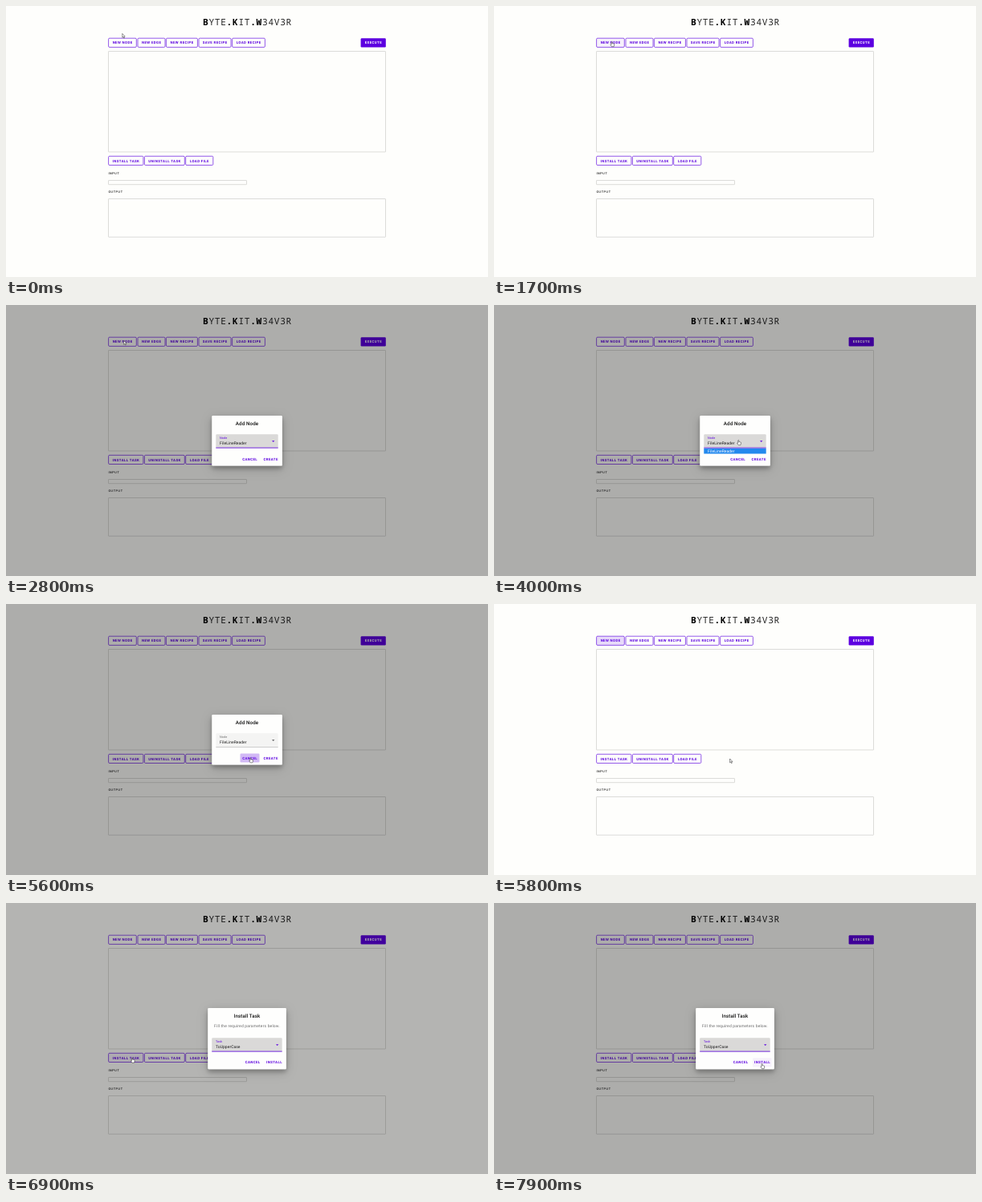
Write an HTML page that moves like this. It is 600 px wide and 338 px high and loops after 8 s.

```html
<!DOCTYPE html>
<html lang="en">
<head>
<meta charset="utf-8">
<title>Recipe editor</title>
<style>
  html, body { margin: 0; width: 100%; height: 100%; overflow: hidden; background: #fefefc; }
  svg { display: block; width: 100vw; height: 100vh; text-rendering: geometricPrecision; }
  text { font-family: Roboto, Arial, sans-serif; white-space: pre; }
  .btn { font-size: 4.375px; font-weight: 600; letter-spacing: .39px; text-anchor: middle; }
  .logo { font: 100 11.2px "Noto Sans Mono", "DejaVu Sans Mono", monospace; letter-spacing: .68px; fill: #222; }
  .logo tspan { font-weight: 900; fill: #000; }
  .over { font-size: 3.75px; font-weight: 500; letter-spacing: .62px; fill: #222; }
  .head { font-size: 6.25px; font-weight: 500; letter-spacing: .1px; text-anchor: middle; fill: #111; }
  .body { font-size: 5px; letter-spacing: .156px; text-anchor: middle; fill: #6b6b6b; }
  .value { font-size: 5px; letter-spacing: .047px; fill: #1c1c1c; }
</style>
</head>
<body>
<svg id="stage" viewBox="0 0 600 338" preserveAspectRatio="none">
  <defs>
    <filter id="shadow" x="-40%" y="-40%" width="180%" height="190%">
      <feDropShadow dx="0" dy="3.5" stdDeviation="2.4" flood-opacity=".22"/>
      <feDropShadow dx="0" dy="3" stdDeviation="6.5" flood-opacity=".2"/>
    </filter>
  </defs>
</svg>
<script>
const LOOP = 8000, STEP = 100;
const PURPLE = '#5c00e0';
const svg = document.getElementById('stage');

function add(parent, tag, attrs = {}, text) {
  const el = document.createElementNS('http://www.w3.org/2000/svg', tag);
  for (const key in attrs) el.setAttribute(key, attrs[key]);
  if (text) el.textContent = text;
  parent.append(el);
  return el;
}

const set = (el, key, value) => el.setAttribute(key, value);
const clamp = v => Math.max(0, Math.min(1, v));
const between = (t, a, b) => t >= a && t < b;

function rect(parent, x, y, x2, y2, attrs) {
  return add(parent, 'rect', { x, y, width: x2 - x, height: y2 - y, ...attrs });
}

function button(parent, label, x, x2, y, kind = 'outlined') {
  const y2 = y + 11.2, solid = kind === 'solid';
  const tint = rect(parent, x, y, x2, y2, { rx: 1.25, fill: PURPLE, 'fill-opacity': solid ? 1 : 0 });
  if (kind === 'outlined')
    rect(parent, x, y, x2, y2, { rx: 1.25, fill: 'none', stroke: PURPLE, 'stroke-width': .65 });
  add(parent, 'text', { class: 'btn', x: (x + x2) / 2 + .15, y: y + 7.2, fill: solid ? '#fff' : PURPLE }, label);
  return { tint, box: [x, y, x2, y2] };
}

// Page
rect(svg, 0, 0, 600, 338, { fill: '#fefefc' });
const logo = add(svg, 'text', { class: 'logo', x: 245, y: 24.2 });
[['B', 'YTE'], ['.K', 'IT'], ['.W', '34V3R']].forEach(([bold, thin]) => {
  add(logo, 'tspan', {}, bold);
  logo.append(thin);
});

const newNode = button(svg, 'NEW NODE', 127.6, 162.3, 40.2);
const pageButtons = [
  newNode,
  button(svg, 'NEW EDGE', 164, 198, 40.2),
  button(svg, 'NEW RECIPE', 199.4, 238.4, 40.2),
  button(svg, 'SAVE RECIPE', 240, 280, 40.2),
  button(svg, 'LOAD RECIPE', 281.6, 322.4, 40.2)
];
button(svg, 'EXECUTE', 441.6, 472.8, 40.2, 'solid');
const installTask = button(svg, 'INSTALL TASK', 127.6, 170.9, 187.3);
pageButtons.push(
  installTask,
  button(svg, 'UNINSTALL TASK', 172.4, 222.3, 187.3),
  button(svg, 'LOAD FILE', 223.7, 257.8, 187.3)
);

[[56.5, 472.5, 182], [217.5, 299.5, 222.7], [240.5, 472.5, 288.2]].forEach(([y, x2, y2]) =>
  rect(svg, 127.5, y, x2, y2, { fill: 'none', stroke: '#cdcdcb', 'stroke-width': .7, rx: .4 }));
add(svg, 'text', { class: 'over', x: 127.4, y: 209.7 }, 'INPUT');
add(svg, 'text', { class: 'over', x: 127.4, y: 233.2 }, 'OUTPUT');

// Dialogs
const scrim = rect(svg, 0, 0, 600, 338, { fill: '#000' });

function dialog(o) {
  const g = add(svg, 'g');
  const [x, y, x2, y2] = o.box;
  rect(g, x, y, x2, y2, { rx: 1.25, fill: '#fefefd', filter: 'url(#shadow)' });
  add(g, 'text', { class: 'head', x: 300, y: y + 12.2 }, o.title);
  if (o.note) add(g, 'text', { class: 'body', x: 300, y: y + 23.6 }, o.note);

  const sx = x + 5, sx2 = x2 - 5.2, sy = o.selectY, sy2 = sy + 17.2;
  const fill = add(g, 'path', {
    d: `M${sx} ${sy2}V${sy + 1.2}q0-1.2 1.2-1.2H${sx2 - 1.2}q1.2 0 1.2 1.2V${sy2}Z`
  });
  const line = rect(g, sx, sy2 - .5, sx2, sy2);
  const label = add(g, 'text', { class: 'value', x: sx + 4.8 }, o.label);
  add(g, 'text', { class: 'value', x: sx + 4.8, y: sy + 12.5 }, o.value);
  const arrow = add(g, 'path', { d: `M${sx2 - 7.7} ${sy + 7.9}h3.4l-1.7 1.8z` });
  const by = y2 - 14;
  return {
    ...o, g, fill, line, label, arrow, sx, sx2, sy, sy2,
    cancel: button(g, 'CANCEL', ...o.cancelX, by, 'text'),
    accept: button(g, o.action, ...o.acceptX, by, 'text')
  };
}

const addNode = dialog({
  box: [256.3, 137.9, 343.9, 200.4], title: 'Add Node', label: 'Node', value: 'FileLineReader',
  selectY: 161.3, action: 'CREATE', cancelX: [291.5, 315.5], acceptX: [317.5, 341.5],
  open: 2441, close: 5660, focus: [2600, 5500]
});
const install = dialog({
  box: [251.2, 131, 348.9, 207.2], title: 'Install Task', note: 'Fill the required parameters below.',
  label: 'Task', value: 'ToUpperCase',
  selectY: 168.3, action: 'INSTALL', cancelX: [295, 319], acceptX: [322.2, 345.6],
  open: 6763, close: LOOP, focus: [6900, LOOP]
});

const menu = add(addNode.g, 'g');
rect(menu, addNode.sx, 178.9, addNode.sx2, 185.5, { fill: '#2389ee' });
add(menu, 'text', { class: 'value', x: addNode.sx + 4.8, y: 183.8, style: 'fill:#fff' }, 'FileLineReader');

// Pointer
const pointer = add(svg, 'g', { stroke: '#222', 'stroke-width': .5, 'stroke-linejoin': 'round', fill: '#fff' });
const arrowShape = add(pointer, 'path', { d: 'M0 0V4.9L1.1 3.9 1.9 5.7 2.7 5.3 1.9 3.6H3.4Z' });
const handShape = add(pointer, 'path', {
  d: 'M-.5.5Q0-.4.5.5V2.4Q1.1 1.9 1.5 2.6 2.1 2.2 2.4 2.9 3.1 2.7 3.1 3.5V4.7L2.5 6.4H-.1L-1.6 4.1Q-1.6 3.2-.5 3.9Z'
});

const path = [
  [0, 144.8, 34.4], [200, 144.8, 34.4], [800, 146.6, 44.3], [2800, 146.6, 44.3],
  [3600, 304.3, 168.3], [4200, 304.3, 168.3], [4400, 304.3, 181], [4700, 304.3, 181],
  [5100, 304.3, 191.5], [5600, 304.3, 191.5], [5800, 293.6, 193], [5900, 293.6, 193],
  [6500, 157, 192.8], [6950, 157, 192.8], [7700, 333.6, 200.3], [LOOP, 333.6, 200.3]
];

function pointerAt(t) {
  const i = path.findIndex(p => p[0] > t);
  const [t0, x0, y0] = path[i - 1], [t1, x1, y1] = path[i];
  const p = (t - t0) / (t1 - t0), e = p * p * (3 - 2 * p);
  return [x0 + (x1 - x0) * e, y0 + (y1 - y0) * e];
}

const inside = ([x, y], [a, b, c, d]) => x >= a && x <= c && y >= b && y <= d;

// cubic-bezier(0, 0, .2, 1)
function decelerate(x) {
  let lo = 0, hi = 1;
  for (let i = 0; i < 20; i++) {
    const s = (lo + hi) / 2;
    if (.6 * s * s + .4 * s ** 3 < x) lo = s; else hi = s;
  }
  return lo * lo * (3 - 2 * lo);
}

function drawDialog(d, t) {
  const age = t - d.open;
  const left = 1 - clamp((t - d.close) / 75);
  const shown = age > 0 && left > 0;
  set(d.g, 'display', shown ? 'inline' : 'none');
  if (!shown) return 0;

  const scale = .8 + .2 * decelerate(clamp(age / 150));
  set(d.g, 'opacity', clamp(age / 75) * left);
  set(d.g, 'transform', `translate(300 169.1) scale(${scale}) translate(-300 -169.1)`);

  const focused = between(t, ...d.focus), floated = age > 100;
  const tone = focused ? PURPLE : '#6a6a6a';
  set(d.fill, 'fill', focused ? '#dad9d8' : '#f4f4f3');
  set(d.line, 'fill', focused ? PURPLE : '#8c8c8c');
  set(d.line, 'y', d.sy2 - (focused ? .8 : .4));
  set(d.line, 'height', focused ? .8 : .4);
  set(d.arrow, 'fill', focused ? PURPLE : '#555');
  set(d.label, 'style', `fill:${tone};font-size:${floated ? 3.75 : 5}px`);
  set(d.label, 'y', d.sy + (floated ? 5.9 : 10.4));
  return .32 * clamp(age / 150) * left;
}

function draw(t) {
  const shade = drawDialog(addNode, t) + drawDialog(install, t);
  set(scrim, 'opacity', shade);

  const open = shade ? (t < 6000 ? addNode : install) : null;
  const listed = between(t, 3800, 4600);
  set(menu, 'display', listed ? 'inline' : 'none');

  const at = pointerAt(t);
  const settling = open && t - open.open < 150;
  const active = open && !settling ? [open.cancel, open.accept] : pageButtons;
  let hand = Boolean(open) && !settling && inside(at, [open.sx, open.sy, open.sx2, open.sy2]);

  [...pageButtons, addNode.cancel, addNode.accept, install.cancel, install.accept].forEach(b => {
    const hover = active.includes(b) && inside(at, b.box);
    const pressed = b === newNode && between(t, 2400, 2600)
      || b === installTask && between(t, 6700, 6900)
      || b === addNode.cancel && between(t, 5500, 5800);
    const focus = b === newNode && between(t, 5700, 6700);
    hand = hand || hover;
    set(b.tint, 'fill-opacity', pressed ? .27 : focus ? .14 : hover ? .05 : 0);
  });

  set(pointer, 'transform', `translate(${at})`);
  set(handShape, 'display', hand ? 'inline' : 'none');
  set(arrowShape, 'display', hand ? 'none' : 'inline');
}

function tick() {
  const t = performance.now() % LOOP;
  draw(Math.floor(t / STEP) * STEP);
  requestAnimationFrame(tick);
}
tick();
</script>
</body>
</html>
```
